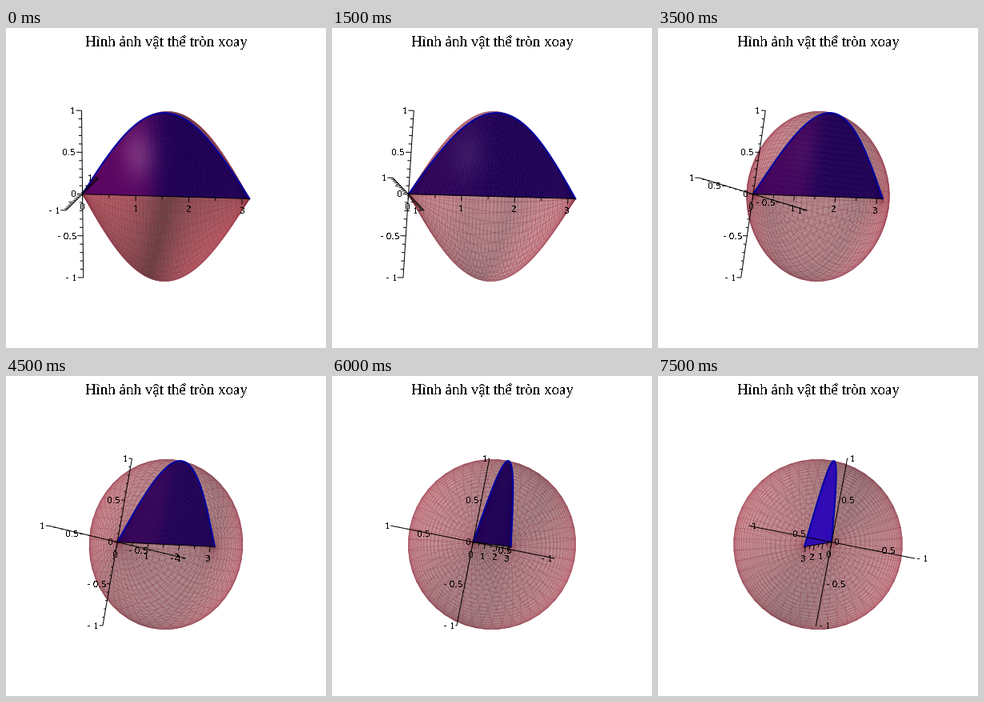
A matplotlib script for the animation above (8000 ms loop, 400 by 400 pixels).

```python
import numpy as np
import matplotlib.pyplot as plt
from matplotlib.animation import FuncAnimation
from matplotlib.collections import LineCollection, PolyCollection

SIZE, DPI = 400, 100
FRAMES, INTERVAL = 16, 500
PX = 72 / DPI                       # one pixel in points
SCALE, CENTER = 106.4, np.array([200.0, 210.5])
START, STEP = np.radians(-11), 2 * np.pi / 49

# The camera turns about its own vertical direction.
UP = np.array([-0.027, 0.191, 0.982])
UP /= np.linalg.norm(UP)
E1 = np.array([1.0, 0, 0]) - UP[0] * UP
E1 /= np.linalg.norm(E1)
E2 = np.cross(E1, UP)

LIGHT = np.array([0.86, -0.41, -0.29])   # two-sided, fixed to the screen
SKIN = np.array([192, 76, 88]) / 255
MESH = np.array([128, 24, 46]) / 255
NAVY = np.array([28, 0, 86])
BLUE = np.array([48, 10, 184])
N = 48

plt.rcParams["font.family"] = "Liberation Serif"
fig = plt.figure(figsize=(SIZE / DPI, SIZE / DPI), dpi=DPI, facecolor="white")
ax = fig.add_axes([0, 0, 1, 1])


def quads(p):
    """Corner points of all cells of a grid of points."""
    q = np.stack([p[:-1, :-1], p[1:, :-1], p[1:, 1:], p[:-1, 1:]], axis=2)
    return q.reshape(-1, 4, p.shape[-1])


def box(x, y, z):
    """Scale x from 0..pi to -1..1; y and z already fit."""
    return np.stack(np.broadcast_arrays(2 * x / np.pi - 1, y, z), axis=-1)


# Solid of revolution of sin(x) about the x axis
u, v = np.meshgrid(np.linspace(0, np.pi, N + 1),
                   np.linspace(0, 2 * np.pi, N + 1), indexing="ij")
solid = quads(box(u, np.sin(u) * np.cos(v), np.sin(u) * np.sin(v)))

um = (u[:-1, :-1] + u[1:, 1:]).ravel() / 2
vm = (v[:-1, :-1] + v[1:, 1:]).ravel() / 2
normals = np.stack([-np.pi / 2 * np.cos(um), np.cos(vm), np.sin(vm)], axis=1)
normals /= np.linalg.norm(normals, axis=1, keepdims=True)

# Flat region under the curve
xs = np.linspace(0, np.pi, 81)
a, b = np.meshgrid(xs, np.linspace(0, 1, 31), indexing="ij")
region = quads(box(a, 0 * a, b * np.sin(a)))
region_mid = region.mean(axis=1)
curve = box(xs, 0 * xs, np.sin(xs))


def camera(k):
    ang = START + STEP * k
    right = np.cos(ang) * E1 + np.sin(ang) * E2
    return right, np.cross(right, UP)


def project(p, right):
    return CENTER + SCALE * np.stack([p @ right, -(p @ UP)], axis=-1)


def draw_solid(k, right, toward):
    facing = normals @ toward
    n_screen = np.stack([normals @ right, normals @ UP, facing], axis=1)
    shade = 0.4 + 0.6 * np.abs(n_screen @ LIGHT)
    face = np.empty((len(solid), 4))
    face[:, :3] = SKIN * shade[:, None]
    face[:, 3] = np.interp(k, [0, 3], [0.6, 0.35])
    flat = project(solid, right)
    for side in (facing < 0, facing >= 0):
        ax.add_collection(PolyCollection(
            flat[side], facecolors=face[side], edgecolors=(*MESH, 0.19),
            linewidths=0.6 * PX))


def draw_region(k, right, toward):
    x, z = region_mid[:, 0], region_mid[:, 2]
    if toward[1] < 0:
        keys = [0, 3, 7, 9, 11]
        tint = np.interp(k, keys, [1, 0.2, 0.6, 0.35, 0.05])
        shine = np.interp(k, keys, [1, 0.45, 0.2, 0.05, 0])
        left = 1 / (1 + np.exp(12 * (x + 0.15)))
        glow = np.exp(-((x + 0.32) / 0.2) ** 2 - ((z - 0.5) / 0.3) ** 2)
        rgb = (NAVY + tint * left[:, None] * [58, 2, 12]
               + shine * glow[:, None] * [36, 44, 28])
    else:
        rgb = np.tile(BLUE, (len(x), 1))
    ax.add_collection(PolyCollection(
        project(region, right), facecolors=np.clip(rgb / 255, 0, 1),
        edgecolors="face", linewidths=0.3 * PX))
    ax.plot(*project(curve, right).T, color="#0000a4", lw=2 * PX)


def write(x, y, text, ha, px):
    ax.text(x, y, text, ha=ha, va="baseline", fontsize=px * PX,
            color="black", antialiased=False, zorder=5)


def label(x, y, value, ha):
    text = f"{abs(value):g}"
    write(x, y + 4, "- " + text if value < 0 else text, ha, 13.2)


def draw_axes(right):
    lines = []

    def axis(p, q):
        lines.append(project(np.array([p, q], float), right))

    def tick(point, direction, length):
        start = project(np.array(point, float), right)
        d = np.array([direction @ right, -(direction @ UP)])
        lines.append([start, start + length * d])
        return start, d

    axis([-1, 0, -1], [-1, 0, 1])
    axis([-1, -1, 0], [-1, 1, 0])
    axis([-1, 0, 0], [1, 0, 0])

    back, down = np.array([-1.0, 0, 0]), np.array([0, 0, -1.0])
    foreshort = abs(right[1]) < 0.35
    for dim in (1, 2):
        for i in range(-10, 11):
            p = [-1, 0, 0]
            p[dim] = i / 10
            major = i % 5 == 0
            start, d = tick(p, back, 7 if major else 4)
            if not major or dim == 1 and (i == 0 or foreshort and abs(i) == 5):
                continue
            end = start + 7 * d
            if d[0] < 0:
                label(end[0] - 1, end[1], i / 10, "right")
            else:
                label(end[0] + 2, end[1], i / 10, "left")

    for i in range(7):
        p = [i / np.pi - 1, 0, 0]
        start, d = tick(p, down, 4 if i % 2 else 7)
        if i % 2 == 0:
            x, y = start + 15.5 * d
            label(x, y, i // 2, "center")

    ax.add_collection(LineCollection(lines, colors="black", linewidths=PX,
                                     zorder=4))


def draw(k):
    ax.clear()
    ax.set_xlim(0, SIZE)
    ax.set_ylim(SIZE, 0)
    ax.axis("off")
    right, toward = camera(k)
    draw_solid(k, right, toward)
    draw_region(k, right, toward)
    draw_axes(right)
    write(200.5, 23, "Hình ảnh vật thể tròn xoay", "center", 19)
    return []


anim = FuncAnimation(fig, draw, frames=FRAMES, interval=INTERVAL,
                     repeat=True, repeat_delay=0)
plt.show()
```
